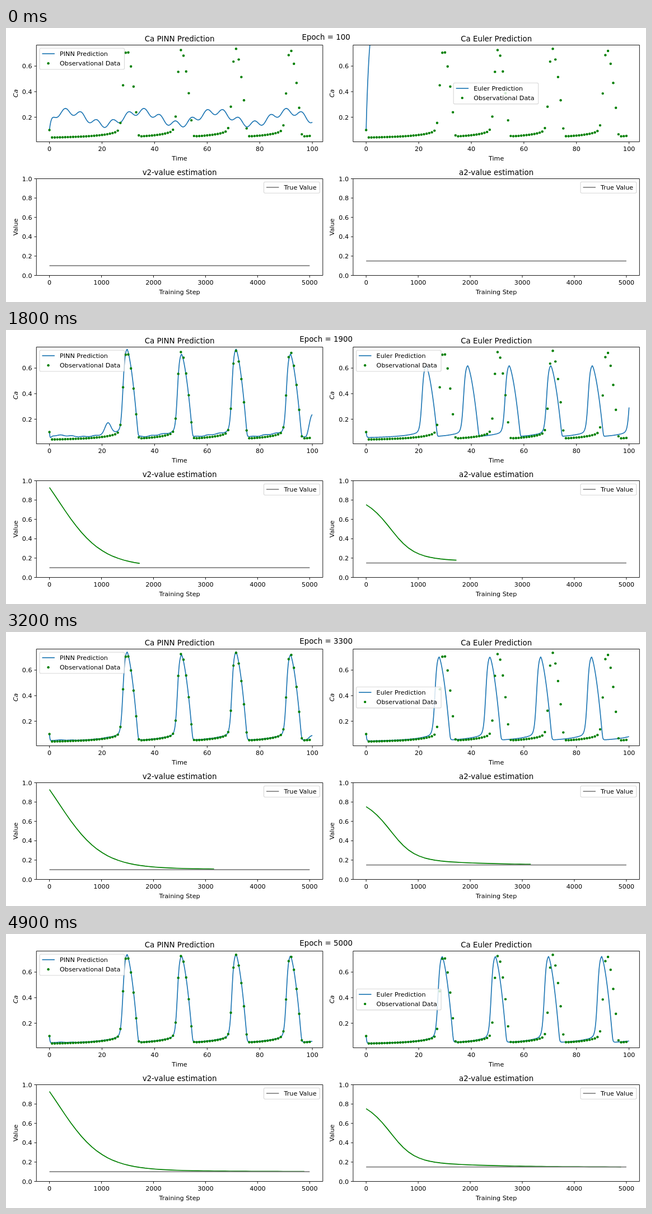
Animation of 1143x490 px, one loop 5000 ms. Source, as an HTML page:

```html
<!DOCTYPE html>
<html lang="en">
<head>
<meta charset="utf-8">
<title>Training progress</title>
<style>
html, body { margin: 0; width: 100%; height: 100%; overflow: hidden; background: #fff; }
svg { display: block; font: 11.2px "DejaVu Sans", sans-serif; }
.title { font-size: 13.4px; }
.line { fill: none; stroke-width: 1.67; stroke-linejoin: round; }
.axis { fill: none; stroke: #000; stroke-width: .9; }
.box { fill: #fff; fill-opacity: .8; stroke: #ccc; stroke-opacity: .8; stroke-width: 1.1; }
</style>
</head>
<body>
<svg id="stage" width="1143" height="490" viewBox="0 0 1143 490"></svg>
<script>
const BLUE = '#1f77b4', GREEN = '#008000', GRAY = '#808080';
const FRAMES = 50, FRAME_MS = 100, LAST_STEP = 5000;
const stage = document.getElementById('stage');
const { exp, min, max, tanh, cbrt } = Math;

const clamp01 = x => min(1, max(0, x));
const mix = (a, b, f) => a + (b - a) * f;
const logistic = x => 1 / (1 + exp(-x));
const bell = x => exp(-x * x);
const cycle = turns => Math.cos(2 * Math.PI * turns);
const range = (count, make) => Array.from({ length: count }, (_, i) => make(i));

// Every calcium curve starts at 0.1 and relaxes to its own value.
const fromStart = (value, t, rate = 5) => value + (.1 - value) * exp(-rate * t);

// Estimated parameters by training step; k counts the recorded epochs.
const stepOf = k => k * LAST_STEP / (FRAMES - 1);
const v2 = s => .101 + .03 * exp(-s / 2000) + 1.332 * logistic((170 - s) / 420);
const a2 = s => .148 + .12 * exp(-s / 1200) + .54 * logistic((475 - s) / 220);

// One calcium spike, by time from its crest: slow ramp, steep rise, curved fall.
function spike(s) {
  const after = max(s, 0);
  const ramp = .028 + .43 / (3.4 - min(s, 0));
  const drop = .696 - .07 * after - .0225 * after * after;
  const top = .049 + (drop + Math.hypot(drop, .05)) / 2;
  return mix(ramp, top, logistic((s + 1.6) / .4));
}
const train = (t, first, period, gain = () => 1) =>
  max(...range(6, n => spike(t - first - n * period) * gain(n)));
const observed = (t, gain) => fromStart(train(t, 29.55, 20.72, gain), t);

// Network prediction: waves at first, then spikes over a shrinking error floor.
const untrained = t => fromStart(.195 + .05 * cycle((t - 7) / 28) + .025 * cycle(t / 6), t, 1.5);

function fitted(k, t) {
  const gain = n => 1 - 2 * exp(-k / 2) + (n % 2 ? -.07 : .04) * exp(-k / 25);
  const ripple = 1 + .15 * cycle((t - 24) / 20.72) + .06 * cycle(t / 4.3)
    + .35 * exp(-t / 8 - max(0, k - 5) / 4) * cycle((t - 1.3) / 7.1);
  const floor = (.033 + .552 * exp(-k / 6)) * ripple * (1 - exp(-2 * t));
  const tail = clamp01((t - 97.5) / 2.5);
  return cbrt(observed(t, gain) ** 3 + floor ** 3)
    + .085 * bell((k - 18) / 7) * bell((t - 22.3) / 1.6)
    + .17 * bell((k - 16) / 12) * tail * tail * (3 - 2 * tail);
}
const network = (k, t) => k < 5 ? mix(untrained(t), fitted(5, t), k / 5) : fitted(k, t);

// Integrated prediction: a plateau, then damped ringing, then sustained spikes.
const level = k => .1 + .95 * v2(stepOf(k));
const firstCrest = k => 29.2 - 38 * exp(-k / 9.75) - 90 * exp(-k / 3.25);
const period = k => 20.4 - 30 * exp(-k / 9.6);
const crest = k => .724 - .783 * exp(-k / 9);

function plateau(k, t) {
  const rise = tanh(t / min(3.1, 1.57 + .3 * k)) ** .85;
  const wobble = .08 * max(0, k - 4) * cycle((t - 7.5) / 9) * exp(-t / 3.2);
  return .1 + (level(k) - .1) * rise * (1 + wobble);
}
function ringing(k, t) {
  const s = t - firstCrest(k), mid = level(k), swing = .014 * min(k, 12);
  if (s < 0) return mix(fromStart(.073 + .002 * t, t), mid + swing, bell(s / 3.1));
  const turn = s / period(k), decay = 1 - .21 * exp((12 - k) / 3);
  const wave = cycle(turn - .0225 * (1 - cycle(turn)));
  return mid + swing * decay ** turn * (wave > 0 ? wave : .78 * wave);
}
function spiking(k, t) {
  const base = .05 + .066 * exp(-k / 10);
  const shape = train(t, firstCrest(k), period(k));
  return fromStart(base + (shape - .05) * (crest(k) - base) / .683, t);
}
function euler(k, t) {
  if (k <= 8) return plateau(k, t);
  return mix(ringing(k, t), spiking(k, t), clamp01((k - 12) / 5));
}

function add(parent, tag, attrs, text) {
  const node = document.createElementNS('http://www.w3.org/2000/svg', tag);
  for (const name in attrs) node.setAttribute(name, attrs[name]);
  if (text !== undefined) node.textContent = text;
  parent.appendChild(node);
  return node;
}
const label = (parent, x, y, text, anchor = 'middle', more = {}) =>
  add(parent, 'text', { x, y, 'text-anchor': anchor, ...more }, text);

const WIDTH = 511.5, HEIGHT = 173;
const timeX = left => t => left + 23.3 + t * 4.695;
const calciumY = v => 205.3 - v * 228.6;
const stepX = left => s => left + 23.3 + s * .09295;
const valueY = v => 442.5 - v * HEIGHT;
const path = points => 'M' + points.map(p => p[0].toFixed(2) + ' ' + p[1].toFixed(2)).join('L');

function axes(left, top, { title, xLabel, yLabel, yStyle, xTicks, yTicks, x, y }) {
  const bottom = top + HEIGHT, middle = left + WIDTH / 2;
  let marks = `M${left} ${top}h${WIDTH}v${HEIGHT}h${-WIDTH}z`;
  for (const tick of xTicks) {
    marks += `M${x(tick)} ${bottom}v3.9`;
    label(stage, x(tick), bottom + 16.3, tick);
  }
  for (const tick of yTicks) {
    marks += `M${left} ${y(tick)}h-3.9`;
    label(stage, left - 7.8, y(tick) + 4.1, tick.toFixed(1), 'end');
  }
  label(stage, middle, top - 6.8, title, 'middle', { class: 'title' });
  label(stage, middle, bottom + 33, xLabel);
  label(stage, 0, 0, yLabel, 'middle', {
    transform: `translate(${left - 33.5} ${top + HEIGHT / 2}) rotate(-90)`,
    'font-style': yStyle
  });
  const id = `clip-${Math.round(left)}-${Math.round(top)}`;
  add(add(stage, 'clipPath', { id }), 'rect', { x: left, y: top, width: WIDTH, height: HEIGHT });
  const plot = add(stage, 'g', { 'clip-path': `url(#${id})` });
  add(stage, 'path', { class: 'axis', d: marks });
  return plot;
}

function legend(x, y, width, height, rows) {
  const group = add(stage, 'g', { transform: `translate(${x} ${y})` });
  add(group, 'rect', { class: 'box', width, height, rx: 2.2 });
  rows.forEach(([text, color, dot], i) => {
    const cy = 9.7 + i * 17.2;
    if (dot) add(group, 'circle', { cx: 15.6, cy, r: 2.2, fill: color });
    else add(group, 'path', { class: 'line', stroke: color, d: `M4.5 ${cy}h22.4` });
    label(group, 36, cy + 4, text, 'start');
  });
  return group;
}

function calciumPanel(left, name) {
  const x = timeX(left);
  const plot = axes(left, 30.5, {
    title: `Ca ${name} Prediction`, xLabel: 'Time', yLabel: 'Ca', yStyle: 'italic',
    xTicks: range(6, i => i * 20), yTicks: range(3, i => (i + 1) / 5), x, y: calciumY
  });
  const line = add(plot, 'path', { class: 'line', stroke: BLUE });
  for (let t = 0; t < 100; t++)
    add(plot, 'circle', { cx: x(t), cy: calciumY(observed(t)), r: 2.2, fill: GREEN });
  const box = legend(left + 5.7, 36.3, 151.5, 37.7,
    [[`${name} Prediction`, BLUE], ['Observational Data', GREEN, true]]);
  const draw = curve =>
    line.setAttribute('d', path(range(501, i => [x(i / 5), calciumY(curve(i / 5))])));
  return { box, draw };
}

function valuePanel(left, name, truth, curve) {
  const x = stepX(left);
  const plot = axes(left, 269.5, {
    title: `${name}-value estimation`, xLabel: 'Training Step', yLabel: 'Value', yStyle: 'normal',
    xTicks: range(6, i => i * 1000), yTicks: range(6, i => i / 5), x, y: valueY
  });
  const line = add(plot, 'path', { class: 'line', stroke: GREEN });
  const trueLine = [0, LAST_STEP].map(s => [x(s), valueY(truth)]);
  add(plot, 'path', { class: 'line', stroke: GRAY, d: path(trueLine) });
  legend(left + 406.2, 275.2, 99.8, 20, [['True Value', GRAY]]);
  return count => {
    const points = range(count, i => [x(stepOf(i)), valueY(curve(stepOf(i)))]);
    line.setAttribute('d', count > 1 ? path(points) : '');
  };
}

const LEFT = 54.3, RIGHT = 619.9;
const networkPanel = calciumPanel(LEFT, 'PINN');
const eulerPanel = calciumPanel(RIGHT, 'Euler');
const drawV2 = valuePanel(LEFT, 'v2', .1, v2);
const drawA2 = valuePanel(RIGHT, 'a2', .15, a2);
const epoch = label(stage, 571.6, 21.3, '', 'middle', { class: 'title' });

// The legend moves to wherever it hides least: center, upper left, center left.
function legendPlace(k) {
  if (k <= 5) return [799.2, 98.2];
  return [625.6, k < 20 ? 36.3 : 98.2];
}

function show(k) {
  epoch.textContent = `Epoch = ${(k + 1) * 100}`;
  networkPanel.draw(t => network(k, t));
  eulerPanel.draw(t => euler(k, t));
  eulerPanel.box.setAttribute('transform', `translate(${legendPlace(k)})`);
  drawV2(k);
  drawA2(k);
}

const start = performance.now();
let shown = -1;
function tick() {
  const k = Math.floor((performance.now() - start) / FRAME_MS) % FRAMES;
  if (k !== shown) show(shown = k);
  requestAnimationFrame(tick);
}
tick();
</script>
</body>
</html>
```
